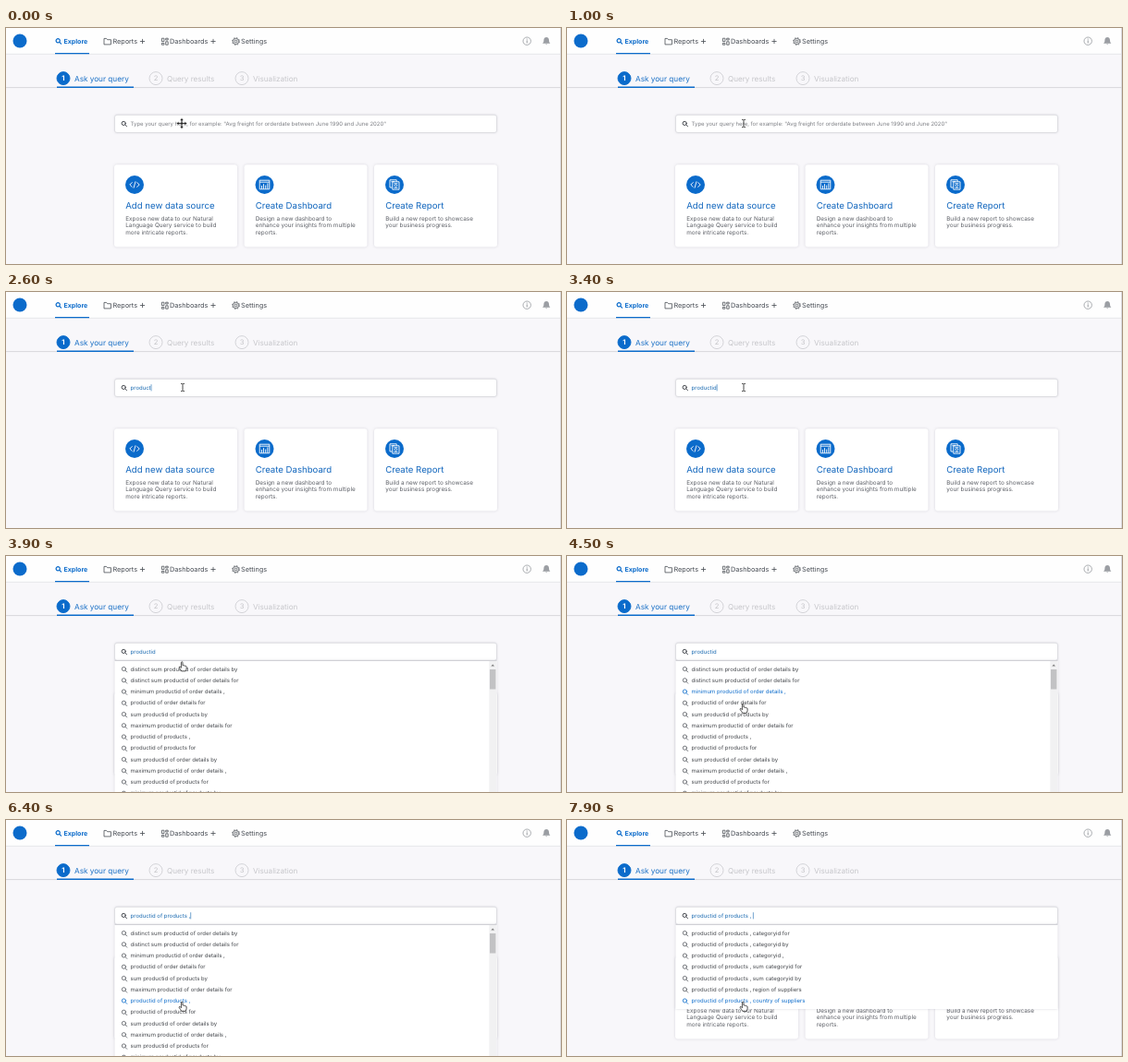
Write an HTML page that moves like this. It is 600 px wide and 256 px high and loops after 8000 ms.

```html
<!DOCTYPE html>
<html lang="en">
<head>
<meta charset="utf-8">
<title>Query builder</title>
<style>
  html, body { margin: 0; width: 100%; height: 100%; overflow: hidden; background: #f8f7fa; }
  svg { display: block; width: 100%; height: 100%; }
  text { font-family: Inter, "Open Sans", sans-serif; white-space: pre; text-rendering: geometricPrecision; }
  .nav { font-size: 7.28px; fill: #454a52; }
  .active { font-size: 7px; font-weight: 700; fill: #0b6bcb; }
  .step { font-size: 8.1px; fill: #c6c6ca; }
  .step.on { font-size: 8.2px; fill: #1a70c6; }
  .num { font-size: 7.6px; text-anchor: middle; fill: #c2c2c6; }
  .num.on { font-weight: 700; fill: #fff; }
  .title { font-size: 9.62px; fill: #1166bd; }
  .body { font-size: 6.4px; fill: #5c5f66; }
  .field, .row { font-size: 5.97px; }
  .field { fill: #1768b0; }
  .hint { fill: #7d7f84; }
  .row { fill: #43464b; }
  .row.hot { fill: #0b6bcb; }
  .line { fill: none; stroke: #4a4e55; stroke-width: .8; }
  .white { fill: none; stroke: #fff; stroke-width: .9; }
  .card { fill: #fff; filter: drop-shadow(0 .6px 1.5px rgba(40, 40, 60, .16)); }
  .pointer { fill: #fff; stroke: #222; stroke-width: .8; stroke-linejoin: round; }
</style>
</head>
<body>
<svg viewBox="0 0 600 256" preserveAspectRatio="none">
  <defs>
    <g id="lens" fill="none" stroke-linecap="round">
      <circle cx="-.6" cy="-.6" r="2.1"/>
      <path d="M1 1 2.8 2.8"/>
    </g>
    <path id="plus" class="line" d="M-2.6 0H2.6M0-2.6V2.6"/>
  </defs>

  <rect width="600" height="256" fill="#f8f7fa"/>
  <rect width="600" height="28" fill="#fefefe"/>
  <path d="M0 28.3H600" stroke="#e2e2e6" stroke-width=".8"/>
  <path d="M53 27.7H90" stroke="#0b6bcb" stroke-width="1.3"/>
  <path d="M599.5 0V256" stroke="#d9d9dd"/>
  <circle cx="15" cy="14" r="7.5" fill="#0b6bcb"/>

  <use href="#lens" x="56.8" y="14.4" stroke="#0b6bcb" stroke-width="1.2"/>
  <text class="active" x="62.5" y="17">Explore</text>
  <path class="line" d="M106 11.4h2.6l1 1.3h3.8v5.2h-7.4z"/>
  <text class="nav" x="115.4" y="17">Reports</text>
  <use href="#plus" x="147.5" y="14.5"/>
  <path class="line" d="M168.4 11.2h2.5v3.4h-2.5zM172.7 11.2h2.5v1.8h-2.5zM168.4 16.4h2.5v1.8h-2.5zM172.7 14.8h2.5v3.4h-2.5z"/>
  <text class="nav" x="177" y="17">Dashboards</text>
  <use href="#plus" x="224" y="14.5"/>
  <circle class="line" cx="248.5" cy="14.5" r="1.3"/>
  <circle class="line" cx="248.5" cy="14.5" r="3.1"/>
  <circle class="line" cx="248.5" cy="14.5" r="3.9" stroke-dasharray="1.5 1.56"/>
  <text class="nav" x="254" y="17">Settings</text>
  <circle cx="563.2" cy="14.2" r="4.2" fill="none" stroke="#95989d" stroke-width=".8"/>
  <path d="M563.2 13.4v3M563.2 11.6v1" stroke="#95989d"/>
  <path d="M580 16.7c1.4-1.2 1.3-2.4 1.4-3.7.1-1.8 1.2-2.7 2.8-2.9 1.6.2 2.7 1.1 2.8 2.9.1 1.3 0 2.5 1.4 3.7zM583 17.4h2.4q-1.2 1.6-2.4 0z" fill="#9b9ea3"/>

  <path d="M0 64.6H600" stroke="#d4d4d8" stroke-width=".9"/>
  <path d="M55 64.3H138" stroke="#0b6bcb" stroke-width="1.4"/>
  <g id="steps"></g>
  <g id="cards"></g>

  <rect x="117.5" y="94.3" width="413" height="19.2" rx="2.5" fill="#fff" stroke="#d9d9dd" stroke-width=".8"
        style="filter:drop-shadow(0 .6px 1.2px rgba(40,40,60,.13))"/>
  <use href="#lens" x="127.8" y="104" stroke="#45494f" stroke-width="1"/>
  <text id="field" class="field" x="134.6" y="105.9"></text>
  <path id="caret" d="M0 100.2V107.4" stroke="#1768b0" stroke-width=".6"/>

  <g id="longList"></g>
  <g id="shortList"></g>

  <path id="move" d="M0-6 2.3-3.2H.9V-.9H3.2V-2.3L6 0 3.2 2.3V.9H.9V3.2H2.3L0 6-2.3 3.2H-.9V.9H-3.2V2.3L-6 0-3.2-2.3V-.9H-.9V-3.2H-2.3z"
        fill="#222" stroke="#fff" stroke-width=".7"/>
  <path id="beam" d="M-2-4.2Q-.3-4.2 0-3.4 .3-4.2 2-4.2M0-3.4V3.4M-2 4.2Q-.3 4.2 0 3.4 .3 4.2 2 4.2" fill="none" stroke="#333" stroke-width=".9"/>
  <path id="hand" class="pointer" d="M-1.6-4.3Q-.8-5.5 0-4.3V-.9Q.8-1.5 1.5-.6 2.3-1.1 2.9-.2 4-.4 4.1.8V2.8Q3.8 4 3.2 5.3H-1.3Q-2.2 3.5-3.8 1.6-4-.1-2.6.7L-1.6 1.7z"/>
</svg>

<script>
const $ = id => document.getElementById(id);
const LOOP = 8000, BLINK = 530;
const ROW_TOP = 122.5, ROW_STEP = 12.25;

const text = (cls, x, y, s) => `<text class="${cls}" x="${x}" y="${y}">${s}</text>`;

$('steps').innerHTML = [[62, 'Ask your query'], [162, 'Query results'], [255, 'Visualization']]
  .map(([x, label], i) => {
    const on = i ? '' : ' on';
    return `<circle cx="${x}" cy="54.6" r="7" fill="${i ? 'none' : '#0b6bcb'}" stroke="${i ? '#d0d0d4' : '#0b6bcb'}" stroke-width=".9"/>`
      + text('num' + on, x, 57.4, i + 1) + text('step' + on, x + 12, 57.6, label);
  }).join('');

const cards = [
  [117, 'Add new data source', ['Expose new data to our Natural', 'Language Query service to build', 'more intricate reports.'],
    'M-2.5-2.7-5.2 0-2.5 2.7M2.5-2.7 5.2 0 2.5 2.7M1-3.6-1 3.6'],
  [257.5, 'Create Dashboard', ['Design a new dashboard to', 'enhance your insights from multiple', 'reports.'],
    'M-5.3-4.8H5.3V4.8H-5.3zM-5.3-2.8H5.3M-3 4.6V1M-1 4.6V-.8M1.2 4.6V.6M3.3 4.6V-1.6'],
  [398, 'Create Report', ['Build a new report to showcase', 'your business progress.'],
    'M-2.5 3H-5V-5.2H2.2V-3.2M-2.2-3.2H5V5.2H-2.2zM-3.6-3.3H0M-.6-1.2H3.4M-.6 3.4H3.4M1.4-.4a1.3 1.3 0 1 0 .1 0'],
];
$('cards').innerHTML = cards.map(([x, title, lines, icon]) =>
  `<rect class="card" x="${x}" y="148.3" width="133" height="89.2" rx="3"/>
   <g transform="translate(${x + 22} 170)"><circle r="10" fill="#0b6bcb"/><path class="white" d="${icon}"/></g>`
  + text('title', x + 12.2, 196.4, title)
  + lines.map((s, i) => text('body', x + 12.2, 208.5 + i * 7.6, s)).join('')).join('');

const longRows = [
  'distinct sum productid of order details by', 'distinct sum productid of order details for',
  'minimum productid of order details ,', 'productid of order details for',
  'sum productid of products by', 'maximum productid of order details for',
  'productid of products ,', 'productid of products for',
  'sum productid of order details by', 'maximum productid of order details ,',
  'sum productid of products for', 'minimum productid of products by',
];
const shortRows = ['categoryid for', 'categoryid by', 'categoryid ,', 'sum categoryid for',
  'sum categoryid by', 'region of suppliers', 'country of suppliers'].map(s => 'productid of products , ' + s);

const rowsMarkup = rows => rows.map((s, i) => {
  const y = ROW_TOP + i * ROW_STEP;
  return `<g class="entry"><use href="#lens" x="128" y="${y + .6}" stroke="#55595f" stroke-width=".8"/>${text('row', 134.6, y + 2.2, s)}</g>`;
}).join('');

const panel = height =>
  `<rect class="card" x="117.5" y="113.5" width="413" height="${height}"/>
   <path d="M117.5 113.4H530.5" stroke="#cbcbd0" stroke-width=".9"/>`;

$('longList').innerHTML = panel(150) +
  `<rect x="522.3" y="114" width="7.8" height="142" fill="#f1f1f2"/>
   <path d="M524.4 119.4 526.2 117.4 528 119.4z" fill="#777"/>
   <rect x="523" y="123" width="6.4" height="21.5" fill="#c2c2c4"/>` + rowsMarkup(longRows);
$('shortList').innerHTML = panel(91.5) + rowsMarkup(shortRows);

const OPEN = 3600, PICK = 6100, REFRESH = 6700;
const keys = [[1500, 'p'], [1650, 'pr'], [1800, 'pro'], [2000, 'prod'], [2150, 'produ'], [2300, 'produc'],
  [2500, 'product'], [2700, 'producti'], [2900, 'productid'],
  [PICK, 'productid of products ,'], [REFRESH, 'productid of products , ']];
const path = [[3700, 103.5], [4300, 165], [4600, 165], [5200, 202]];

const show = (id, on) => $(id).setAttribute('visibility', on ? 'visible' : 'hidden');
const ease = p => p * p * (3 - 2 * p);

function pointerY(t) {
  if (t <= path[0][0]) return path[0][1];
  for (let i = 1; i < path.length; i++) {
    const [t0, y0] = path[i - 1], [t1, y1] = path[i];
    if (t < t1) return y0 + (y1 - y0) * ease((t - t0) / (t1 - t0));
  }
  return path[path.length - 1][1];
}

function highlight(id, hot) {
  $(id).querySelectorAll('.entry').forEach((entry, i) => {
    entry.lastChild.classList.toggle('hot', i === hot);
    entry.firstChild.setAttribute('stroke', i === hot ? '#0b6bcb' : '#55595f');
  });
}

function draw(t) {
  const key = keys.filter(k => k[0] <= t).pop();
  const field = $('field');
  field.textContent = key ? key[1] : 'Type your query here, for example: "Avg freight for orderdate between June 1990 and June 2020"';
  field.classList.toggle('hint', !key);
  const lit = key ? Math.floor((t - key[0]) / BLINK) % 2 === 0 : t > 1200;
  show('caret', lit);
  const end = key ? field.getComputedTextLength() + .5 : 0;
  $('caret').setAttribute('transform', `translate(${134.6 + end} 0)`);

  const y = pointerY(t);
  // The highlighted row trails the pointer slightly.
  const hot = Math.round((pointerY(t - 120) - 7 - ROW_TOP) / ROW_STEP);
  show('longList', t >= OPEN && t < REFRESH);
  show('shortList', t >= REFRESH);
  highlight('longList', t < 4700 ? Math.min(hot, 2) : hot);
  highlight('shortList', shortRows.length - 1);

  const shape = t < 400 ? 'move' : y < 112 ? 'beam' : 'hand';
  for (const id of ['move', 'beam', 'hand']) {
    show(id, id === shape);
    $(id).setAttribute('transform', `translate(${id === 'move' ? 190 : 191} ${y})`);
  }
}

const start = performance.now();
function tick(now) {
  draw(Math.max(0, now - start) % LOOP);
  requestAnimationFrame(tick);
}
draw(0);
requestAnimationFrame(tick);
</script>
</body>
</html>
```
